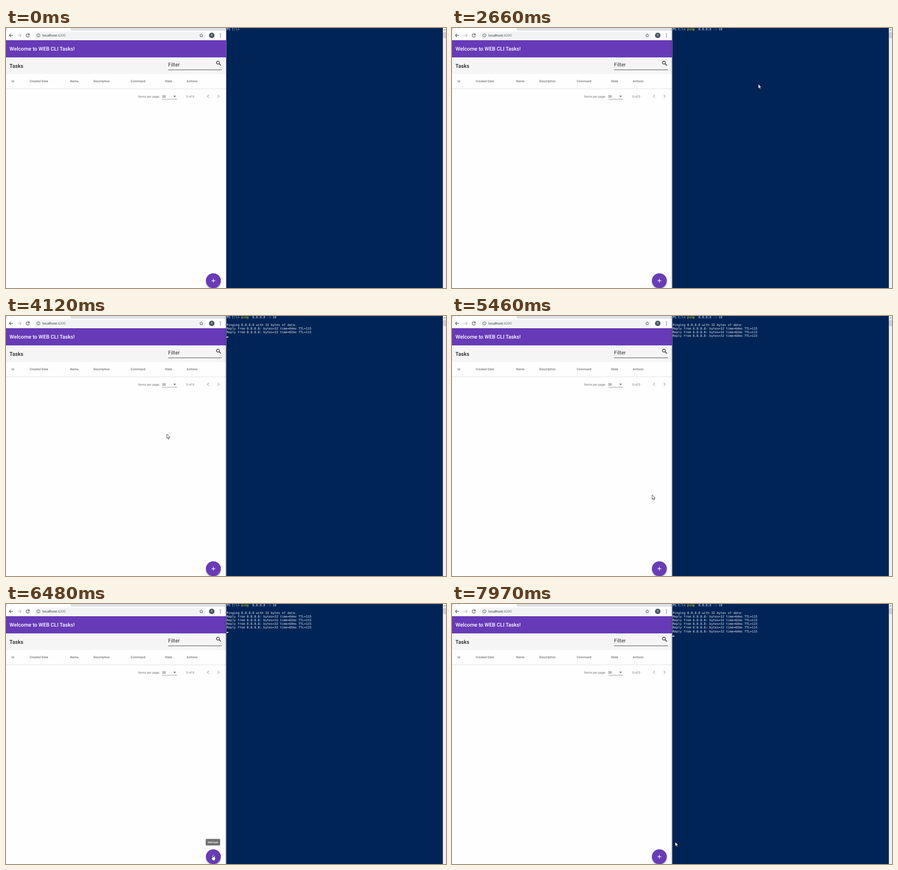
An HTML page that plays this animation: 974 by 575 pixels, repeating every 8000 ms.

```html
<!DOCTYPE html>
<html lang="en">
<head>
<meta charset="utf-8">
<title>Web CLI tasks</title>
<style>
  html, body { margin: 0; width: 100%; height: 100%; overflow: hidden; background: #fff; }
  svg { display: block; width: 974px; height: 575px; text-rendering: geometricPrecision; }
  text { white-space: pre; }
  .ui { font-family: Roboto, sans-serif; font-size: 7px; fill: #757575; }
  .title { font-size: 11.6px; font-weight: 500; fill: #212121; }
  .head { font-weight: 500; }
  .url { font-family: "Open Sans", sans-serif; font-size: 7.6px; fill: #202124; }
  .term { font-family: "DejaVu Sans Mono", monospace; font-size: 6.79px; fill: #eeedf0; }
  .icon { fill: none; stroke: #505357; stroke-width: 1.2; }
</style>
</head>
<body>
<svg viewBox="0 0 974 575" xmlns="http://www.w3.org/2000/svg">
  <defs>
    <linearGradient id="edge">
      <stop offset="0" stop-color="#000" stop-opacity="0"/>
      <stop offset="1" stop-color="#000" stop-opacity=".28"/>
    </linearGradient>
    <filter id="lift" x="-40%" y="-40%" width="180%" height="190%">
      <feDropShadow dx="0" dy="2" stdDeviation="1.8" flood-opacity=".38"/>
    </filter>
  </defs>

  <!-- browser chrome -->
  <rect width="488" height="575" fill="#fefefe"/>
  <path d="M143 0H488V6H147Q143 6 143 2Z" fill="#dee1e6"/>
  <path d="M0 0H3Q3 5 0 5Z" fill="#dee1e6"/>
  <circle cx="14.5" cy="-1" r="2" fill="#e2a48f"/>
  <rect x="62" y="8.5" width="380" height="15.5" rx="7.75" fill="#f1f3f4"/>
  <path class="icon" d="M15.2 16.3H7.6M11.2 12.6 7.5 16.3 11.2 20"/>
  <path class="icon" d="M26 16.3H33.6M30 12.6 33.7 16.3 30 20" style="stroke:#bcbec0"/>
  <path class="icon" d="M51 13.9A3.7 3.7 0 1 0 52 17.1"/>
  <path d="M52.2 12V15.8H48.4Z" fill="#505357"/>
  <circle class="icon" cx="71.6" cy="16.3" r="3.6" style="stroke-width:.9"/>
  <path class="icon" d="M71.6 15.8V18.4M71.6 14V15" style="stroke-width:.9"/>
  <text class="url" x="80.8" y="19.1">localhost<tspan fill="#5f6368">:4200</tspan></text>
  <path class="icon" style="stroke-width:.9" d="M432.2 12.6 433.3 15.1 436 15.4 434 17.2 434.6 19.9 432.2 18.5 429.8 19.9 430.4 17.2 428.4 15.4 431.1 15.1Z"/>
  <circle cx="455.4" cy="16.2" r="6" fill="#455560"/>
  <text class="ui" x="455.4" y="18.4" text-anchor="middle" style="font-size:6px;fill:#fff">R</text>
  <g fill="#505357">
    <circle cx="474.6" cy="12.9" r=".95"/><circle cx="474.6" cy="16.3" r=".95"/><circle cx="474.6" cy="19.7" r=".95"/>
  </g>

  <!-- page -->
  <rect y="27" width="488" height="38" fill="#673ab7"/>
  <text class="ui title" x="7.8" y="50" style="fill:#fff">Welcome to WEB CLI Tasks!</text>
  <rect y="65" width="488" height="37" fill="#f5f5f5"/>
  <text class="ui title" x="7.8" y="87.6">Tasks</text>
  <text class="ui title" x="358.8" y="85" style="font-weight:400;fill:#333">Filter</text>
  <rect x="359" y="92" width="119" height="1" fill="#444"/>
  <circle cx="469.2" cy="76.6" r="3.2" fill="none" stroke="#222" stroke-width="1.3"/>
  <path d="M471.6 79 475.6 83" stroke="#222" stroke-width="1.6"/>
  <g id="heads" class="ui head"></g>
  <rect y="134" width="488" height="1" fill="#e0e0e0"/>
  <text class="ui" x="292.5" y="153.5">Items per page:</text>
  <text class="ui" x="345.8" y="153.5" style="fill:#222">20</text>
  <path d="M370.2 149.8H376.4L373.3 152.9Z" fill="#757575"/>
  <rect x="346" y="157" width="32.5" height="1" fill="#949494"/>
  <text class="ui" x="399" y="153.5">0 of 0</text>
  <path d="M449.2 147.6 445.7 151.1 449.2 154.6M468.8 147.6 472.3 151.1 468.8 154.6" fill="none" stroke="#a6a6a6" stroke-width="1.2"/>
  <circle cx="459" cy="558.8" r="16.4" fill="#673ab7" filter="url(#lift)"/>
  <path d="M454.8 558.8H463.2M459 554.6V563" stroke="#fff" stroke-width="1.3"/>
  <g id="tip">
    <rect x="442" y="519.5" width="32" height="14.5" rx="2" fill="#717171"/>
    <text class="ui" x="458" y="529" text-anchor="middle" style="font-size:5.8px;font-weight:500;fill:#fff">Add task</text>
  </g>

  <!-- terminal -->
  <rect id="shade" x="484" width="4" height="575" fill="url(#edge)"/>
  <rect x="487" width="1" height="575" fill="#6d7f9b"/>
  <rect x="488" width="479" height="575" fill="#012456"/>
  <rect x="967" width="7" height="575" fill="#f0f0f0"/>
  <rect x="967.5" y="9" width="6.5" height="13.5" fill="#cdcdcd"/>
  <path d="M968.8 5.4 971 3.2 973.2 5.4" fill="none" stroke="#505050"/>
  <g id="lines" class="term"></g>
  <rect id="caret" width="4" height="2" fill="#eeedf0"/>

  <g id="mouse">
    <path id="arrow" transform="scale(.6)" d="M0 0V16.5L3.8 13 6.4 19 9 17.9 6.4 12H11.6Z" fill="#fff" stroke="#111" stroke-width="1.3"/>
    <path id="hand" fill="#fff" stroke="#111" stroke-width=".7" stroke-linejoin="round"
      d="M-1 .8Q0-.8 1 .8V4.6Q2-.0 1 4.2Q2.2 3.7 2.9 4.7Q4 4.2 4.4 5.2Q5.6 5 5.7 6.4V8.6Q5.5 10.4 4.5 11V12.4H-.6V11.4Q-2.2 9.7-3.6 7Q-3-.0-3.4 6.2Q-2.2 5.6-1 7.4Z"/>
  </g>
</svg>
<script>
const NS = "http://www.w3.org/2000/svg";
const LOOP = 8000, COL = 4.087, ROW = 8.16, LEFT = 488.2;
const $ = id => document.getElementById(id);

function add(parent, tag, attrs, text = "") {
  const el = document.createElementNS(NS, tag);
  for (const k in attrs) el.setAttribute(k, attrs[k]);
  el.textContent = text;
  return parent.appendChild(el);
}
const show = (el, on) => el.setAttribute("visibility", on ? "inherit" : "hidden");

[["Id", 12], ["Created Date", 52.5], ["Name", 142], ["Description", 193.5],
 ["Command", 276], ["State", 351.7], ["Actions", 400]]
  .forEach(([label, x]) => add($("heads"), "text", { x, y: 120.3 }, label));

const line = (row, text) =>
  add($("lines"), "text", { x: LEFT, y: 5.4 + ROW * row }, text);

// Command line: coloured pieces revealed by character count
const pieces = [["PS C:\\> "], ["ping  ", "#ffff00"], ["8.8.8.8 "], ["-n ", "#7f8794"], ["10"]];
const prompt = line(0, "");
const spans = pieces.map(([text, fill]) =>
  ({ text, el: add(prompt, "tspan", fill ? { fill } : {}) }));
const typing = [[0, 8], [1420, 13], [1650, 21], [1730, 27]];

// Each printed line: time, row, text
const reply = ms => `Reply from 8.8.8.8: bytes=32 time=${ms}ms TTL=115`;
const output = [
  [3130, 2, "Pinging 8.8.8.8 with 32 bytes of data:"],
  [3210, 3, reply(64)], [4120, 4, reply(62)], [5140, 5, reply(64)],
  [6160, 6, reply(65)], [7180, 7, reply(64)]
].map(([at, row, text]) => ({ at, row, el: line(row, text) }));

const caretOn = [[330, 570], [1120, 2110], [2510, 2660], [3520, 4440], [5530, 6880], [7730, LOOP]];

// Pointer moves: start, end, number of steps, target x, y
const home = [890, 700];
const moves = [
  [260, 640, 6, 678, 124],
  [3520, 3810, 5, 356, 261],
  [4440, 4910, 7, 443, 392],
  [5460, 5460, 1, 443, 395.5],
  [5530, 6240, 10, 456, 540],
  [6310, 6390, 2, 457.8, 555],
  [7730, 7970, 4, 494, 526]
];
const easeOut = u => 1 - (1 - u) ** 2;
const easeInOut = u => u * u * (3 - 2 * u);

function pointer(t) {
  let [x, y] = home;
  moves.forEach(([from, to, steps, tx, ty], i) => {
    if (t < from) return;
    const gap = (to - from) / Math.max(1, steps - 1);
    const step = gap ? Math.min(steps, Math.floor((t - from) / gap + 1e-6) + 1) : steps;
    const p = (i ? easeInOut : easeOut)(step / steps);
    x += (tx - x) * p;
    y += (ty - y) * p;
  });
  return [x, y];
}

function tipOpacity(t) {
  if (t < 6390 || t >= 7970) return 0;
  if (t < 6470) return .4;
  if (t < 7810) return 1;
  return t < 7890 ? .7 : .25;
}

function draw(t) {
  const typed = typing.filter(([at]) => t >= at).pop()[1];
  let left = typed;
  for (const { text, el } of spans) {
    el.textContent = text.slice(0, Math.max(0, left));
    left -= text.length;
  }

  let row = t < 2510 ? 0 : 1;
  for (const o of output) {
    const on = t >= o.at;
    show(o.el, on);
    if (on) row = o.row + 1;
  }
  const caret = $("caret");
  show(caret, caretOn.some(([a, b]) => t >= a && t < b));
  caret.setAttribute("x", LEFT + (row ? 0 : typed * COL));
  caret.setAttribute("y", 4.8 + ROW * row);

  const [x, y] = pointer(t);
  const overButton = Math.hypot(x - 459, y - 558.8) < 16.4;
  $("mouse").setAttribute("transform", `translate(${x} ${y})`);
  show($("arrow"), !overButton);
  show($("hand"), overButton);
  $("tip").setAttribute("opacity", tipOpacity(t));
  show($("shade"), t >= 260);
}

const start = performance.now();
function tick() {
  draw((performance.now() - start) % LOOP);
  requestAnimationFrame(tick);
}
tick();
</script>
</body>
</html>
```
